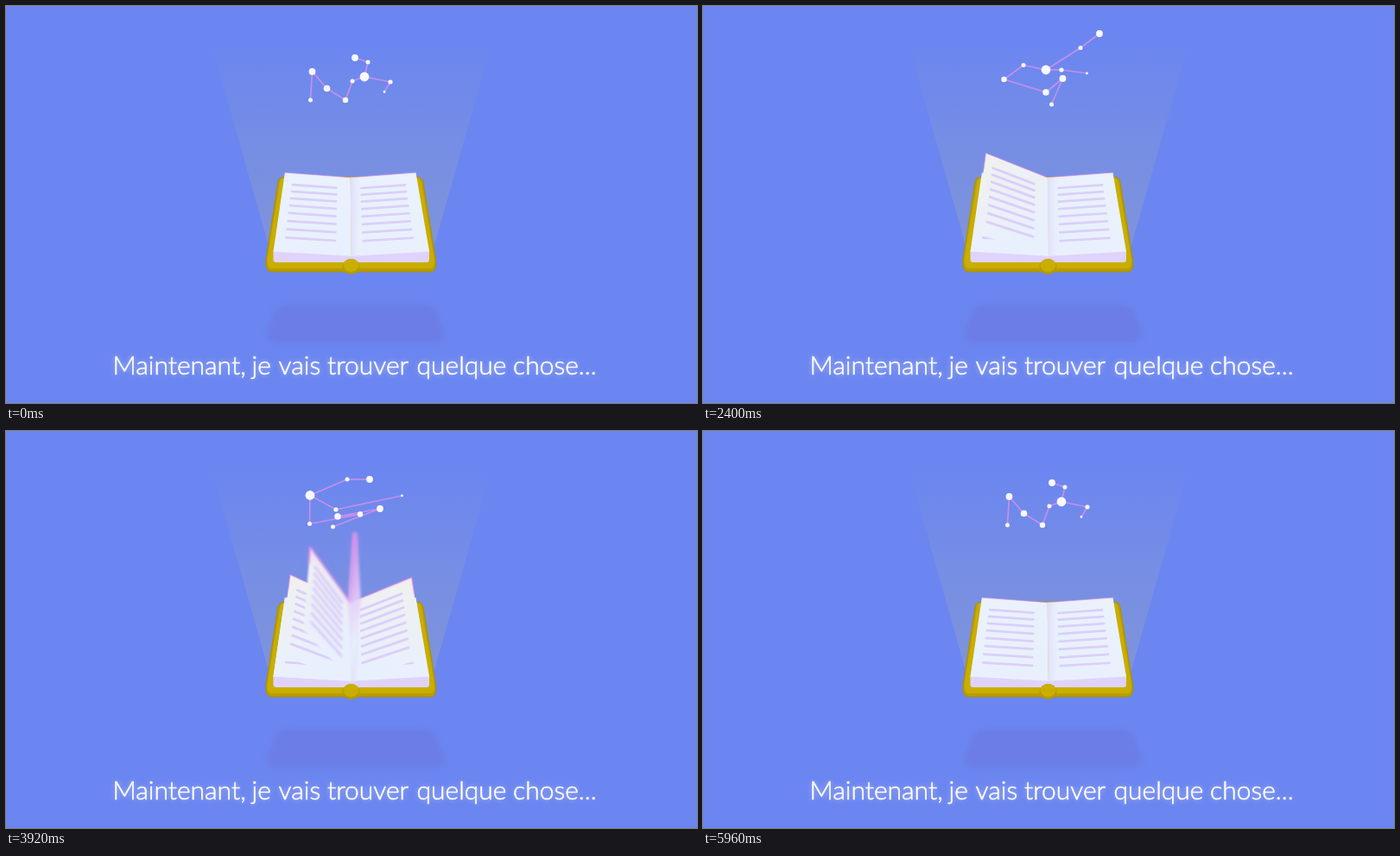
Recreate the animation shown at these times as an HTML page with a canvas. Size 800x460 px, loop 6 s.

```html
<!DOCTYPE html>
<html lang="fr">
<head>
<meta charset="utf-8">
<style>
  html, body { margin: 0; width: 800px; height: 460px; overflow: hidden; background: #6b86f0; }
  svg, canvas { position: absolute; left: 0; top: 0; }
  text { font: 300 30px Lato, "Open Sans", sans-serif; fill: #fff; stroke: #fff; stroke-width: .55px;
         text-shadow: 0 0 6px rgba(255,255,255,.35); }
</style>
</head>
<body>
<svg width="800" height="460" viewBox="0 0 800 460">
  <defs>
    <linearGradient id="beam" x1="0" y1="0" x2="0" y2="1">
      <stop offset="0" stop-color="#c8c88c" stop-opacity="0"/>
      <stop offset=".55" stop-color="#c8c88c" stop-opacity=".13"/>
      <stop offset="1" stop-color="#c8c88c" stop-opacity=".21"/>
    </linearGradient>
    <filter id="soft" x="-20%" y="-40%" width="140%" height="180%"><feGaussianBlur stdDeviation="3"/></filter>
  </defs>
  <path d="M238 44H562L496 277H304Z" fill="url(#beam)"/>
  <path d="M326 345H484Q494 345 499 355L508 378Q509 391 495 391H315Q301 391 302 378L311 355Q316 345 326 345Z"
        fill="#6c7de7" filter="url(#soft)"/>
  <g stroke-linejoin="round">
    <path d="M322 198Q316 199 315 204L301 294Q300 307.500 307 308H492Q499 307.500 497.500 294L483 204Q482 199 476 198Z"
          fill="#b89d00" stroke="#a98f08" stroke-width="1"/>
    <path d="M322 199Q318 199 317 205L302.500 293Q302 304 308 304H491Q497 304 496 293L481 205Q480 199 476 199Z" fill="#c9ae00"/>
    <path d="M309.500 283L400 289L490 283V294Q490 297 487 297H313Q309.500 297 309.500 294Z" fill="#e0d3fb"/>
    <ellipse cx="399.500" cy="302" rx="10" ry="9" fill="#b39900"/>
    <ellipse cx="399.500" cy="300.500" rx="9" ry="7.500" fill="#c9ae00"/>
  </g>
  <text y="426.500"><tspan x="123.500">Maintenant,</tspan> <tspan x="284.500">je</tspan> <tspan x="315.500">vais</tspan>
    <tspan x="372">trouver</tspan> <tspan x="475.500">quelque</tspan> <tspan x="587">chose...</tspan></text>
</svg>
<canvas id="stage" width="800" height="460"></canvas>
<script>
const ctx = document.getElementById('stage').getContext('2d');
const LOOP = 6000, STEP = 40, FLAT = 4;

const clamp = s => Math.min(1, Math.max(0, s));
const mix = (a, b, s) => a + (b - a) * s;
const smooth = s => s * s * (3 - 2 * s);

function trace(points) {
  ctx.beginPath();
  points.forEach(p => ctx.lineTo(p[0], p[1]));
}

// Constellation: four key poses, each a run of x, y pairs
const poses = [
  [352.5,109, 354.5,76, 371.5,95.5, 393,109, 401,87, 415,82, 419,65, 404,60, 445,88, 438,99.5],
  [403.5,114, 416.5,84, 397,100, 348.5,85, 371,68.5, 397,74, 437,48.5, 459,32, 415,74, 444.5,78],
  [410,115, 441.5,91, 400.5,100.5, 357,84, 361.5,75, 383,73, 417,57.5, 410,51, 405,85, 455,75],
  [378.5,111, 433,90, 384,99, 410,96.5, 351.5,107.5, 352,74.5, 395,56, 421,56, 382,91, 458.5,75]
];
const radii = [2.5, 3.9, 3.8, 3.2, 2.5, 5.4, 2.5, 3.9, 2.6, 1.4];
const links = [[0, 1], [1, 2], [2, 3], [3, 4], [4, 5], [5, 6], [6, 7], [5, 8], [8, 9]];
const LOOSE = 1;   // the star that drifts home late

function starAt(i, t) {
  const travel = i > 5 ? 1900 : 2200;   // the outer arms arrive early
  const home = i === LOOSE ? 1.4 : 3;
  const [from, s] =
    t < 2400 ? [0, clamp(t / travel) ** 3] :
    t < 3240 ? [1, smooth((t - 2400) / 840)] :
    t < 3920 ? [2, smooth((t - 3240) / 680)] :
    [3, 1 - (1 - clamp((t - 3920) / 1480)) ** home];
  const a = poses[from], b = poses[(from + 1) % poses.length];
  return [mix(a[2 * i], b[2 * i], s), mix(a[2 * i + 1], b[2 * i + 1], s), radii[i]];
}

function drawStars(t) {
  const stars = radii.map((_, i) => starAt(i, t));
  ctx.strokeStyle = '#c68eec';
  ctx.lineWidth = 1.7;
  links.forEach(([a, b]) => {
    trace([stars[a], stars[b]]);
    ctx.stroke();
  });
  ctx.fillStyle = '#f8f8ff';
  stars.forEach(([x, y, r]) => {
    ctx.beginPath();
    ctx.arc(x, y, r, 0, 2 * Math.PI);
    ctx.fill();
  });
}

// Turning pages: lie right at launch, pass an angle midway, lie left when settled
const turns = [
  { launch: 150, pass: 1640, angle: 36, settle: 4100 },
  { launch: 2440, pass: 3240, angle: 64, settle: 4640 },
  { launch: 2950, pass: 3240, angle: 159, settle: 4400 },
  { launch: 3270, pass: 3920, angle: 94, settle: 4920 },
  { launch: 3620, pass: 3920, angle: 159, settle: 5060 }
];

// Two cubic halves that share one speed at the pass
function turnAngle({ launch, pass, angle, settle }, t) {
  const v1 = (angle - 180 + FLAT) / (pass - launch), v2 = (FLAT - angle) / (settle - pass);
  const v = 2 * v1 * v2 / (v1 + v2);
  if (t < pass) {
    const h = pass - launch, s = (t - launch) / h;
    return mix(180 - FLAT, angle, smooth(s)) - v * h * s * s * (1 - s);
  }
  const h = settle - pass, s = (t - pass) / h;
  return mix(angle, FLAT, smooth(s)) + v * h * s * (1 - s) ** 2;
}

// Point on a page: u from spine to edge, v from top to bottom
function pagePoint(deg, u, v) {
  const a = deg * Math.PI / 180;
  const rx = 76 + 14.5 * v, ry = 81 - 6 * v;
  return [398.7 + 1.1 * v - u * rx * Math.cos(a), 198.7 + 91 * v - u * ry * Math.sin(a)];
}

function drawPage(deg, speed) {
  const at = (u, v) => pagePoint(deg, u, v);
  const lift = Math.sin(deg * Math.PI / 180);
  const glow = Math.min(1, speed / .09) * lift;
  const left = deg < 90, upright = Math.abs(deg - 90) < 18;
  ctx.save();
  ctx.lineJoin = 'round';
  if (glow > .3) ctx.filter = `blur(${(glow * 1.4).toFixed(2)}px)`;

  const fill = ctx.createLinearGradient(...at(1, 0), ...at(.25, .75));
  fill.addColorStop(0, upright ? 'rgba(226,160,238,.7)' : lift > .3 ? '#f0f1ee' : '#eaf2fd');
  fill.addColorStop(1, '#e9f0fd');
  // A page seen edge-on smears into a wedge
  trace(upright
    ? [[396, 199], pagePoint(deg - 2, 1, 0), pagePoint(deg + 2, 1, 0), [411, 197], at(0, 1)]
    : [at(0, 0), at(1, 0), at(1, 1), at(0, 1)]);
  ctx.fillStyle = fill;
  ctx.fill();

  ctx.strokeStyle = 'rgba(221,140,232,.75)';
  ctx.shadowColor = `rgba(226,130,236,${glow})`;
  ctx.shadowBlur = glow * 9;
  ctx.lineWidth = .9 + glow;
  trace(lift > .3 ? [at(0, 0), at(1, 0), at(1, .2)] : [at(0, 0), at(1, 0)]);
  ctx.stroke();
  ctx.shadowColor = 'transparent';

  if (!left) {
    const gutter = ctx.createLinearGradient(398, 0, 411, 0);
    gutter.addColorStop(0, 'rgba(220,216,246,.85)');
    gutter.addColorStop(1, 'rgba(228,230,250,0)');
    trace([at(0, 0), at(.15, 0), at(.13, 1), at(0, 1)]);
    ctx.fillStyle = gutter;
    ctx.fill();
  }
  if (!upright) {
    ctx.strokeStyle = '#dbcff9';
    ctx.lineWidth = 2.7 + lift * .7;
    ctx.lineCap = 'round';
    const [u0, u1] = left ? [.21, .86] : [.16, .81];
    for (let row = 0; row < 8; row++) {
      const v = .145 + .082 * row + .002 * row * row;
      trace([at(u0, v), at(u1, v)]);
      ctx.stroke();
    }
  }
  ctx.restore();
}

function draw(t) {
  ctx.clearRect(0, 0, 800, 460);
  drawPage(FLAT, 0);
  drawPage(180 - FLAT, 0);
  turns.filter(p => t > p.launch && t < p.settle)
    .map(p => ({ deg: turnAngle(p, t), speed: Math.abs(turnAngle(p, t + 20) - turnAngle(p, t - 20)) / 40 }))
    .sort((a, b) => Math.abs(b.deg - 90) - Math.abs(a.deg - 90))
    .forEach(p => drawPage(p.deg, p.speed));
  drawStars(t);
}

const begin = performance.now();
function tick() {
  const t = (performance.now() - begin) % LOOP;
  draw(Math.floor(t / STEP) * STEP);
  requestAnimationFrame(tick);
}
tick();
</script>
</body>
</html>
```
